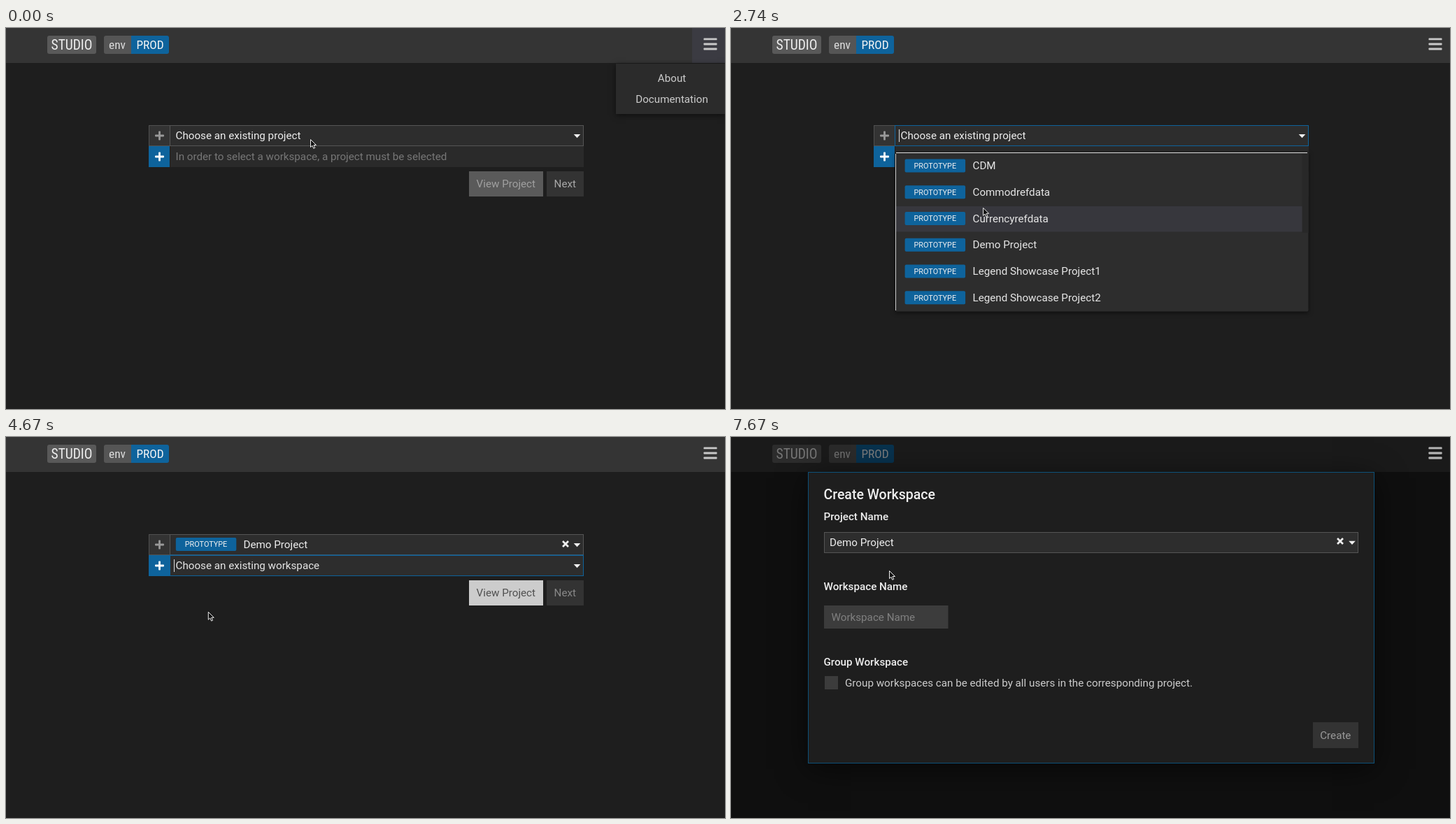
These frames come from a looping animation (1028 px wide and 545 px high, 8000 ms). An HTML page with a canvas:

```html
<!DOCTYPE html>
<html lang="en">
<head>
<meta charset="utf-8">
<title>Workspace setup</title>
<style>
  html, body { margin: 0; width: 100%; height: 100%; overflow: hidden; background: #1e1e1e; }
  canvas { display: block; }
</style>
</head>
<body>
<canvas id="stage" width="1028" height="545"></canvas>
<script>
const ctx = document.getElementById('stage').getContext('2d');
const LOOP = 8000;
const SANS = 'Roboto, sans-serif';
const NARROW = '"Roboto Condensed", Roboto, sans-serif';
const BLUE = '#0e639c', PANEL = '#2d2d2d', LINE = '#555555';

const AT = {
  focus: 730, open: 1530, select: 3790, workspaceFocus: 4350,
  plusHover: 5240, plusPress: 6050, modal: 6290
};
// time, x, y of the pointer tip
const PATH = [
  [80, 435, 159], [320, 386, 158], [960, 386, 158], [1290, 377, 161],
  [1940, 377, 161], [2580, 361, 248], [2660, 361, 248], [3220, 355, 309],
  [4270, 355, 309], [4670, 289, 250], [4910, 240, 202], [5160, 240, 202],
  [5400, 226, 197], [5480, 226, 197], [5720, 226, 191]
];
const CLICKS = [
  { start: 650, x: 386, y: 158, r: 17 },
  { start: 3470, x: 353, y: 309, r: 16.5 },
  { start: 6050, x: 224, y: 191, r: 22.5 }
];
const PROJECTS = ['CDM', 'Commodrefdata', 'Currencyrefdata', 'Demo Project',
  'Legend Showcase Project1', 'Legend Showcase Project2'];
const ROW_TOP = 179.4, ROW_STEP = 37.75;

const clamp = v => Math.max(0, Math.min(1, v));
const blinkOn = (t, start) => Math.floor((t - start) / 500) % 2 === 0;

function rect(x, y, w, h, fill, radius = 0) {
  ctx.fillStyle = fill;
  ctx.beginPath();
  ctx.roundRect(x, y, w, h, radius);
  ctx.fill();
}

function frame(x, y, w, h, color) {
  ctx.strokeStyle = color;
  ctx.lineWidth = 1;
  ctx.strokeRect(x + 0.5, y + 0.5, w - 1, h - 1);
}

function text(str, x, y, color, { size = 15.2, weight = 400, align = 'left', family = SANS, stretch = '' } = {}) {
  ctx.font = `${weight} ${stretch} ${size}px ${family}`;
  ctx.textAlign = align;
  ctx.fillStyle = color;
  ctx.fillText(str, x, y);
}

function shadowed(blur, offset, draw) {
  ctx.save();
  ctx.shadowColor = 'rgba(0,0,0,0.55)';
  ctx.shadowBlur = blur;
  ctx.shadowOffsetY = offset;
  draw();
  ctx.restore();
}

function plus(x, y, color) {
  rect(x - 6.5, y - 1.4, 13, 2.8, color, 0.8);
  rect(x - 1.4, y - 6.5, 2.8, 13, color, 0.8);
}

function triangle(x, y) {
  ctx.fillStyle = '#eeeeee';
  ctx.beginPath();
  ctx.moveTo(x - 4.8, y);
  ctx.lineTo(x + 4.8, y);
  ctx.lineTo(x, y + 5.2);
  ctx.fill();
}

function cross(x, y) {
  ctx.strokeStyle = '#eeeeee';
  ctx.lineWidth = 2.7;
  ctx.beginPath();
  ctx.moveTo(x - 4, y - 4);
  ctx.lineTo(x + 4, y + 4);
  ctx.moveTo(x + 4, y - 4);
  ctx.lineTo(x - 4, y + 4);
  ctx.stroke();
}

function badge(x, y) {
  rect(x, y, 86.5, 19, BLUE, 2);
  text('PROTOTYPE', x + 43.2, y + 13.4, '#f0f0f0', { size: 10.85, align: 'center' });
}

function hamburger(color) {
  for (const y of [14.5, 21.6, 28.6]) rect(997.5, y, 19, 2.8, color, 0.6);
}

function narrow(str, x, y, color, size) {
  text(str, x, y, color, { size, align: 'center', family: NARROW, stretch: 'condensed' });
}

function header() {
  rect(0, 0, 1028, 50, '#343434');
  rect(59, 11, 70, 26, '#595959', 3);
  narrow('STUDIO', 94, 31, '#eeeeee', 19.5);
  rect(140, 11, 45, 26, '#555555', 3);
  narrow('env', 159, 30, '#dddddd', 17.4);
  rect(179, 11, 54, 26, BLUE, [0, 3, 3, 0]);
  narrow('PROD', 206, 30, '#f4f4f4', 17.4);
}

function menu() {
  rect(981, 0, 47, 50, '#3b3b42');
  shadowed(8, 2, () => rect(872, 51, 156, 72, '#2b2b2b'));
  text('About', 952, 77, '#cccccc', { align: 'center' });
  text('Documentation', 952, 107, '#cccccc', { align: 'center' });
}

function selectors(t) {
  const chosen = t >= AT.select;
  const projectFocus = t >= AT.focus && t < AT.workspaceFocus;
  const workspaceFocus = t >= AT.workspaceFocus && t < AT.plusPress;

  rect(204, 139, 31, 30, '#333333');
  frame(204, 139, 31, 30, '#505050');
  plus(219.5, 154, '#999999');
  rect(235, 139, 591, 30, PANEL);
  rect(204, 169, 30, 30, t >= AT.plusHover ? '#0f6cb0' : BLUE);
  plus(219.5, 184, '#ffffff');
  rect(235, 169, 591, 30, chosen ? PANEL : '#2a2a2a');
  if (chosen) frame(234, 169, 592, 30, workspaceFocus ? BLUE : LINE);
  frame(234, 139, 592, 30, projectFocus ? BLUE : LINE);
  if (workspaceFocus) rect(234, 168.5, 592, 1, BLUE);

  if (chosen) {
    badge(242.8, 144);
    text('Demo Project', 339.5, 158.5, '#eeeeee');
    cross(800, 153);
    text('Choose an existing workspace', 242.5, 188.8, '#e6e6e6');
    triangle(816.5, 182);
  } else {
    text('Choose an existing project', 242.5, 158.5, '#eeeeee');
    text('In order to select a workspace, a project must be selected', 242.5, 188.8, '#777777');
  }
  triangle(816.5, 152);

  if (t >= AT.focus && !chosen && blinkOn(t, 731)) rect(240, 145, 1, 18, '#dddddd');
  if (workspaceFocus && blinkOn(t, 4225)) rect(240, 175, 1, 18, '#dddddd');

  rect(662, 205, 106, 36, chosen ? '#cccccc' : '#5a5a5a');
  text('View Project', 714.8, 228, chosen ? '#505050' : '#a0a0a0', { align: 'center' });
  rect(773, 205, 53, 36, '#333333');
  text('Next', 799.3, 228, chosen ? '#888888' : '#a8a8a8', { align: 'center' });
}

function dropdown(t, pointerY) {
  shadowed(6, 2, () => rect(235, 178, 590.5, 227.5, PANEL, 2));
  rect(236, 178, 588, 1, '#dddddd');
  rect(235, 180, 1, 224, '#cccccc');
  rect(816.5, 180, 9, 113, '#282828');

  const hovered = Math.max(0, Math.floor((pointerY - ROW_TOP) / ROW_STEP));
  PROJECTS.forEach((name, i) => {
    const top = ROW_TOP + i * ROW_STEP;
    if (i === hovered) {
      rect(236, Math.round(top), 580.5, 36.5, t >= 3470 ? '#264f78' : '#37373d');
    }
    badge(248.6, top + 8);
    text(name, 345.5, top + 22.8, '#e6e6e6');
  });
}

function modal(t) {
  rect(0, 0, 1028, 545, 'rgba(0,0,0,0.5)');
  hamburger('#b4b4b4');
  shadowed(40, 8, () => rect(110, 50, 810, 417, '#1e1e1e'));
  frame(110, 50, 810, 417, '#0d5078');

  const label = (str, y, size) => text(str, 132.5, y, '#eeeeee', { size, weight: 500 });
  label('Create Workspace', 89, 19.5);
  label('Project Name', 119.3);
  rect(133, 136, 764, 30, PANEL);
  frame(133, 136, 764, 30, LINE);
  text('Demo Project', 141, 155.5, '#eeeeee');
  cross(871, 149);
  triangle(888, 148.8);

  label('Workspace Name', 219.3);
  rect(133, 241, 177.5, 33, '#3c3c3c');
  text('Workspace Name', 143.5, 262.5, '#808080');
  if (blinkOn(t, 6170)) rect(143.5, 248, 1, 18, '#dddddd');

  label('Group Workspace', 327.3);
  rect(134, 342, 19, 19, '#3c3c3c');
  text('Group workspaces can be edited by all users in the corresponding project.', 163, 356.8, '#cccccc');
  rect(832, 408, 65, 37, '#333333');
  text('Create', 864.3, 431.5, '#999999', { align: 'center' });
}

function pointerAt(t) {
  const next = PATH.findIndex(p => p[0] > t);
  if (next === 0) return PATH[0].slice(1);
  if (next < 0) return PATH[PATH.length - 1].slice(1);
  const [t0, x0, y0] = PATH[next - 1], [t1, x1, y1] = PATH[next];
  const k = (t - t0) / (t1 - t0);
  return [x0 + (x1 - x0) * k, y0 + (y1 - y0) * k];
}

function clickRing(t, { start, x, y, r }) {
  const age = t - start;
  if (age < 0 || age > 780) return;
  const grow = clamp((age + 60) / 200);
  const fade = clamp((age - 280) / 440);
  ctx.save();
  ctx.globalAlpha = grow * (1 - fade);
  ctx.beginPath();
  ctx.arc(x, y, r * (0.5 + 0.5 * grow) * (1 - 0.27 * fade), 0, Math.PI * 2);
  ctx.fillStyle = 'rgba(120,115,190,0.08)';
  ctx.fill();
  ctx.shadowColor = 'rgba(0,0,0,0.5)';
  ctx.shadowBlur = 5;
  ctx.strokeStyle = '#928dc8';
  ctx.lineWidth = r > 20 ? 2.8 : 2.3;
  ctx.stroke();
  ctx.restore();
}

function arrow(x, y) {
  ctx.save();
  ctx.translate(x + 0.5, y + 0.5);
  ctx.beginPath();
  [[0, 0], [0, 11], [2.5, 8.7], [4.3, 12.8], [6.2, 12], [4.5, 8], [8, 8]]
    .forEach(([px, py]) => ctx.lineTo(px, py));
  ctx.closePath();
  ctx.fillStyle = '#111111';
  ctx.fill();
  ctx.strokeStyle = '#eeeeee';
  ctx.lineWidth = 1;
  ctx.stroke();
  ctx.restore();
}

function iBeam(x, y) {
  for (const [color, width] of [['#111111', 3], ['#eeeeee', 1.2]]) {
    ctx.strokeStyle = color;
    ctx.lineWidth = width;
    ctx.beginPath();
    ctx.moveTo(x - 3.5, y - 6.5);
    ctx.quadraticCurveTo(x, y - 6.5, x, y - 4);
    ctx.lineTo(x, y + 4);
    ctx.quadraticCurveTo(x, y + 6.5, x - 3.5, y + 6.5);
    ctx.moveTo(x + 3.5, y - 6.5);
    ctx.quadraticCurveTo(x, y - 6.5, x, y - 4);
    ctx.moveTo(x, y + 4);
    ctx.quadraticCurveTo(x, y + 6.5, x + 3.5, y + 6.5);
    ctx.moveTo(x - 2, y + 1.5);
    ctx.lineTo(x + 2, y + 1.5);
    ctx.stroke();
  }
}

function draw(t) {
  const [x, y] = pointerAt(t);
  rect(0, 0, 1028, 545, '#1e1e1e');
  header();
  if (t < AT.focus) menu();
  hamburger('#c8c8c8');
  selectors(t);
  if (t >= AT.open && t < AT.select) dropdown(t, y);
  if (t >= AT.modal) modal(t);
  CLICKS.forEach(click => clickRing(t, click));
  if (t >= 960 && t < 2100) iBeam(x, y);
  else arrow(x, y);
}

const began = performance.now();
function tick() {
  draw((performance.now() - began) % LOOP);
  requestAnimationFrame(tick);
}
tick();
</script>
</body>
</html>
```
